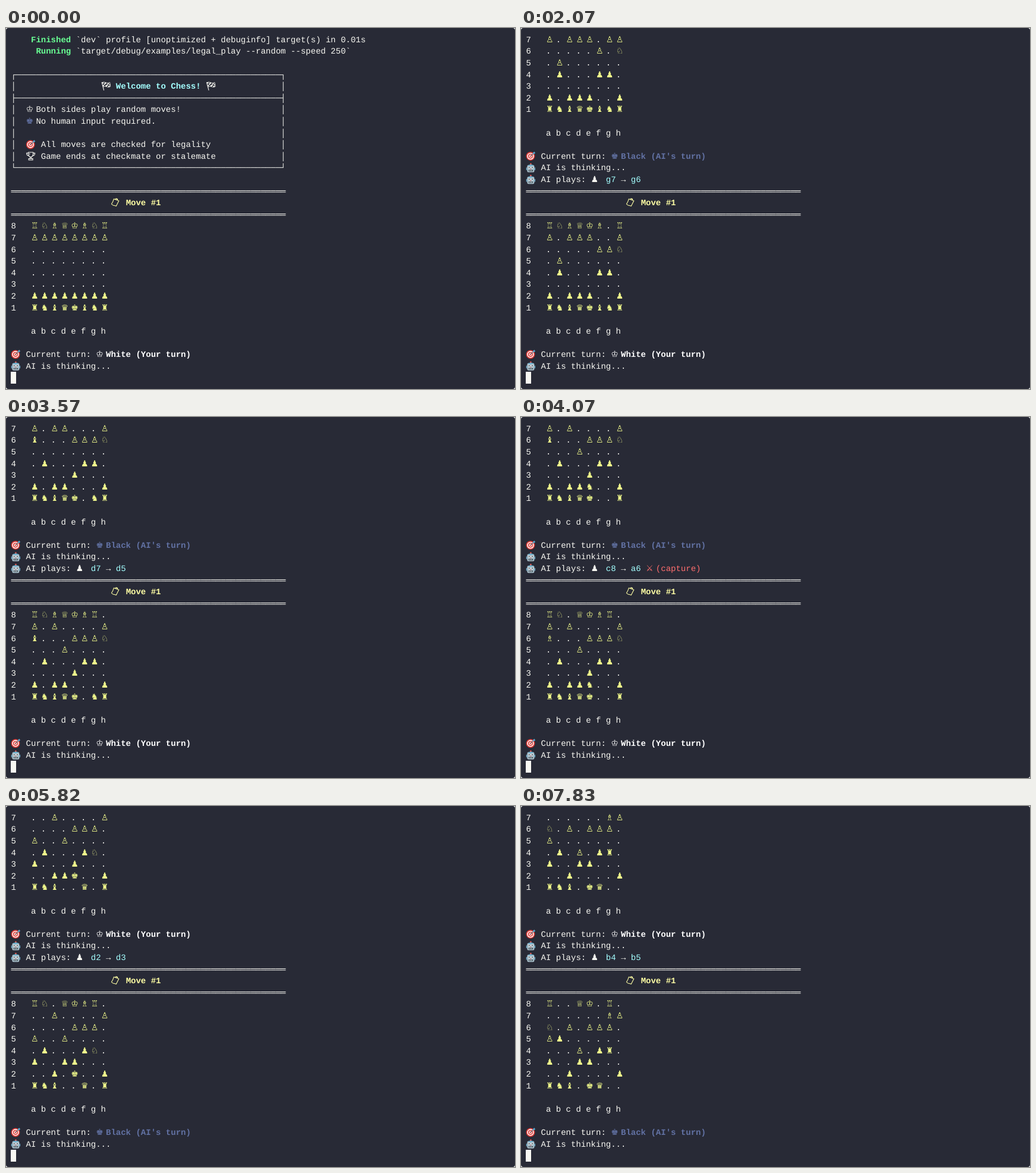
An HTML page for the animation above (8000 ms loop, 856 px wide and 607 px high).

```html
<!DOCTYPE html>
<html lang="en">
<head>
<meta charset="utf-8">
<title>Terminal chess</title>
<style>
html, body { margin: 0; width: 100%; height: 100%; overflow: hidden; background: #fff; }
svg { display: block; }
text { font: 14px "Liberation Mono", monospace; white-space: pre; text-rendering: geometricPrecision; }
text.b { font-weight: bold; }
text.s { font-family: "DejaVu Sans", sans-serif; }
</style>
</head>
<body>
<svg id="stage" width="856" height="607" viewBox="0 0 856 607">
  <defs>
    <g id="dart">
      <circle cx="7.6" cy="8.2" r="7.4" fill="#e03a35"/>
      <circle cx="7.6" cy="8.2" r="5.7" fill="#fafafa"/>
      <circle cx="7.6" cy="8.2" r="4.1" fill="#e03a35"/>
      <circle cx="7.6" cy="8.2" r="2.5" fill="#fafafa"/>
      <circle cx="7.6" cy="8.2" r="1.2" fill="#e03a35"/>
      <path d="M7.6 8.2 12.5 3.6" stroke="#51606a" stroke-width="1.1"/>
      <path d="M11.4 4.6 11.8 2.2 14.3 .4 14.6 1.9 16 2.3 14 4.4Z" fill="#5aa7cf"/>
    </g>
    <g id="robot">
      <path d="M8 1V4" stroke="#90a4ae" stroke-width="1.6"/>
      <circle cx="8" cy="1.5" r="1.3" fill="#e5574f"/>
      <path d="M.4 7.5H2V12H.4ZM14 7.5H15.6V12H14Z" fill="#6fb3d2"/>
      <rect x="2" y="3.4" width="12" height="12.2" rx="2.2" fill="#a9bfca"/>
      <path d="M4 3.5Q8 1.6 12 3.5V5H4Z" fill="#6fb3d2"/>
      <circle cx="5.3" cy="7.6" r="1.8" fill="#fff"/>
      <circle cx="10.7" cy="7.6" r="1.8" fill="#fff"/>
      <circle cx="5.3" cy="7.6" r="1" fill="#263238"/>
      <circle cx="10.7" cy="7.6" r="1" fill="#263238"/>
      <path d="M8 8.8 9 10.6H7Z" fill="#e5574f"/>
      <rect x="4.2" y="11.6" width="7.6" height="2.3" rx="1" fill="#37474f"/>
      <path d="M5.4 12.7H10.6" stroke="#eceff1" stroke-dasharray="1 .6"/>
    </g>
    <g id="flag" fill="none" stroke="#f8f8f2">
      <path d="M1.4 1.4 5 15" stroke-width="1.1"/>
      <path d="M1.6 2Q5 .2 8 2T15 1.8L16 8.6Q13 10.6 10 9T3.6 9.4" stroke-width=".8"/>
      <path d="M2 3.2Q5 1.2 8 3.2T15 3" stroke-width="2" stroke-dasharray="2.4 2.4"/>
      <path d="M2.6 5.3Q5.4 3.5 8.6 5.4T15.4 5.2" stroke-width="2" stroke-dasharray="2.4 2.4" stroke-dashoffset="2.4"/>
      <path d="M3.2 7.5Q6 5.7 9.2 7.6T15.8 7.4" stroke-width="2" stroke-dasharray="2.4 2.4"/>
    </g>
    <g id="cup" fill="none" stroke="#f8f8f2" stroke-width="1.1">
      <path d="M4 1.6H12V5Q11.6 9 8 9.6Q4.4 9 4 5Z"/>
      <path d="M4 3H1Q1 7 5 7.6M12 3H15Q15 7 11 7.6"/>
      <path d="M7 9.6V12M9 9.6V12M4.6 12.2H11.4V14.6H4.6Z"/>
      <path d="M6 3V5.6" stroke-width=".9"/>
    </g>
    <g id="clip" fill="none" stroke="#ffffa5" stroke-width="1.1" stroke-linejoin="round">
      <path d="M5 1.6 13.4 4.6 8.8 13.6Q6.8 12.6 5 12.7Q2.8 12.4 1 10.2Q3.6 6.4 5 1.6Z"/>
      <path d="M7.6 2.4 8.6 1 11 1.8 11 3.6" stroke-width="1.3"/>
    </g>
  </defs>
  <rect width="856" height="607" rx="4" fill="#282a36"/>
  <g id="screen"></g>
</svg>
<script>
const CW = 8.4015, LH = 19.6, X0 = 8.4, Y0 = 9.8, LOOP = 8000;
const C = { fg: "#f8f8f2", white: "#ffffff", dim: "#6272a4", piece: "#f1fa8c",
  yellow: "#ffffa5", cyan: "#a4ffff", green: "#69ff94", red: "#ff6e6e" };

const START = ["♖♘♗♕♔♗♘♖", "♙♙♙♙♙♙♙♙", "........", "........",
  "........", "........", "♟♟♟♟♟♟♟♟", "♜♞♝♛♚♝♞♜"];
const MOVES = ("b2b4 g8h6 f2f3 f7f6 f3f4 b7b5 g2g4 g7g6 e2e3 h8g8 f1b5 e7e6 b5a6 d7d5 g1e2 c8a6 " +
  "a2a3 a6e2 e1e2 h6g4 d1f1 a7a5 d2d3 c7c6 h1g1 f8g7 e2e1 b8a6 g1g4 d5d4 b4b5").split(" ");

const at = sq => [8 - sq[1], sq.charCodeAt(0) - 97];

// boards[n] is the position after n moves
const boards = [START.map(r => [...r])], captures = [];
for (const m of MOVES) {
  const b = boards[boards.length - 1].map(r => [...r]);
  const [r1, c1] = at(m.slice(0, 2)), [r2, c2] = at(m.slice(2));
  captures.push(b[r2][c2] !== ".");
  b[r2][c2] = b[r1][c1];
  b[r1][c1] = ".";
  boards.push(b);
}

const px = col => (X0 + col * CW).toFixed(2);
const put = (col, row, str, fill = C.fg, cls = "") =>
  `<text x="${px(col)}" y="${(Y0 + row * LH + 14).toFixed(2)}" fill="${fill}" class="${cls}">${str}</text>`;
const sym = (col, row, ch, fill) => put(col, row, ch, fill, "s");
const icon = (id, col, row) =>
  `<use href="#${id}" x="${px(col)}" y="${(Y0 + row * LH + 1.6).toFixed(2)}"/>`;

function intro() {
  const bar = "─".repeat(53);
  let s = put(4, 0, "Finished", C.green, "b") +
    put(13, 0, "`dev` profile [unoptimized + debuginfo] target(s) in 0.01s") +
    put(5, 1, "Running", C.green, "b") +
    put(13, 1, "`target/debug/examples/legal_play --random --speed 250`") +
    put(0, 3, `┌${bar}┐`) + put(0, 5, `├${bar}┤`) + put(0, 11, `└${bar}┘`);
  for (const row of [4, 6, 7, 8, 9, 10]) s += put(0, row, "│") + put(54, row, "│");
  return s + icon("flag", 18, 4) + put(21, 4, "Welcome to Chess!", C.cyan, "b") + icon("flag", 39, 4) +
    sym(3, 6, "♔", C.fg) + put(5, 6, "Both sides play random moves!") +
    sym(3, 7, "♚", C.dim) + put(5, 7, "No human input required.") +
    icon("dart", 3, 9) + put(6, 9, "All moves are checked for legality") +
    icon("cup", 3, 10) + put(6, 10, "Game ends at checkmate or stalemate");
}

// Position n with its rank 8 on the given row, and the turn lines below
function position(n, top) {
  let s = "";
  boards[n].forEach((rank, r) => {
    const row = top + r;
    if (row < 0) return;
    s += put(0, row, 8 - r);
    rank.forEach((p, c) => {
      s += p === "." ? put(4 + 2 * c, row, p) : sym(4 + 2 * c, row, p, C.piece);
    });
  });
  const black = n % 2, fill = black ? C.dim : C.white;
  return s + put(4, top + 9, "a b c d e f g h") +
    icon("dart", 0, top + 11) + put(3, top + 11, "Current turn:") +
    sym(17, top + 11, black ? "♚" : "♔", fill) +
    put(19, top + 11, black ? "Black (AI's turn)" : "White (Your turn)", fill, "b") +
    icon("robot", 0, top + 12) + put(3, top + 12, "AI is thinking...");
}

function played(n) {
  const m = MOVES[n];
  return icon("robot", 0, 12) + put(3, 12, "AI plays:") + sym(13, 12, "♟", C.fg) +
    put(16, 12, m.slice(0, 2), C.cyan) + put(19, 12, "→") + put(21, 12, m.slice(2), C.cyan) +
    (captures[n] ? sym(24, 12, "⚔", C.red) + put(26, 12, "(capture)", C.red) : "");
}

function screenAt(n) {
  const rule = "═".repeat(55);
  return (n ? position(n - 1, -1) + played(n - 1) : intro()) +
    put(0, 13, rule) + icon("clip", 20, 14) + put(23, 14, "Move #1", C.yellow, "b") + put(0, 15, rule) +
    position(n, 16) +
    `<rect x="8" y="578" width="9" height="20" fill="${C.fg}"/>`;
}

function moveCount(t) {
  if (t < 320) return 0;
  if (t >= 7830) return 31;
  return Math.min(30, 1 + Math.floor((t - 320) / 250));
}

const screenEl = document.getElementById("screen");
let shown = -1;
function draw(now) {
  const n = moveCount(now % LOOP);
  if (n !== shown) screenEl.innerHTML = screenAt(shown = n);
}
function tick() {
  draw(performance.now());
  requestAnimationFrame(tick);
}
tick();
</script>
</body>
</html>
```
